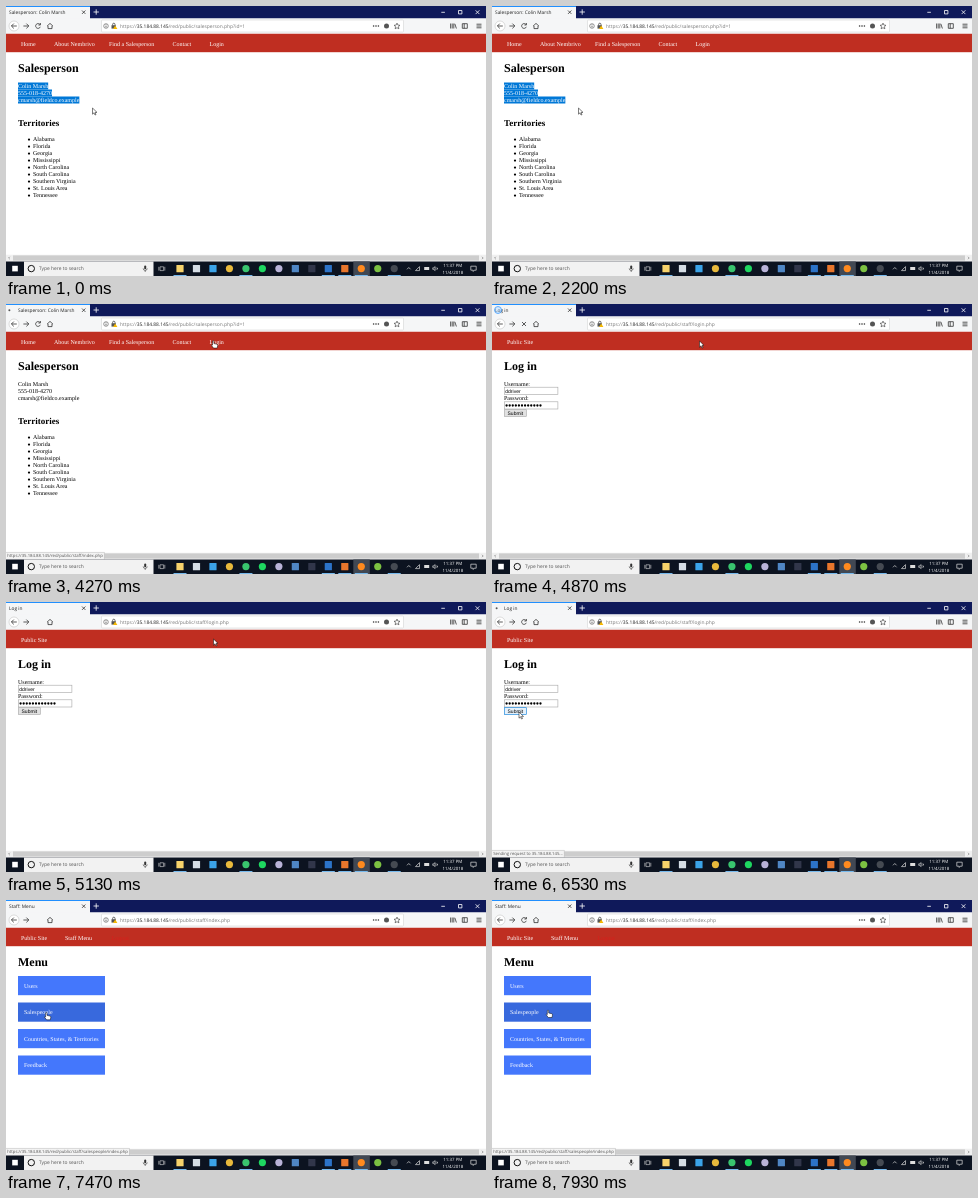
Animation of 480 by 270 pixels, one loop 8000 ms. Source, as an HTML page:

```html
<!DOCTYPE html>
<html lang="en">
<head>
<meta charset="utf-8">
<title>Browser session</title>
<style>
  html, body { margin: 0; width: 100%; height: 100%; overflow: hidden; background: #fff; }
  svg { display: block; width: 480px; height: 270px; }
  text { font: 6px "Liberation Serif", serif; fill: #000; text-rendering: geometricPrecision; white-space: pre; }
  .h1 { font-size: 12px; font-weight: bold; }
  .h2 { font-size: 9px; font-weight: bold; }
  .ui text { font-family: "Open Sans", sans-serif; font-size: 4.8px; fill: #222; }
  .field { font: 5px "Liberation Sans", sans-serif; }
  .white, .selected text { fill: #fff; }
  .line { fill: none; stroke: #333; stroke-width: .8; }
  .ui text.clock { font-size: 4.4px; fill: #fff; text-anchor: middle; }
</style>
</head>
<body>
<svg viewBox="0 0 480 270">
  <rect width="480" height="270" fill="#fff"/>
  <rect y="27.5" width="480" height="18.7" fill="#bf2e21"/>
  <g id="pages"></g>

  <g class="ui">
    <rect width="480" height="12.5" fill="#0f195a"/>
    <rect width="84" height="13" fill="#f5f6f7"/>
    <rect width="84" height=".9" fill="#0a84ff"/>
    <text id="title" y="8"></text>
    <circle id="dot" cy="6.2" r="1" fill="#555"/>
    <circle id="burst" cx="6" cy="6" fill="#9fd0ff" fill-opacity=".45" stroke="#3b9bff"/>
    <path class="line" d="M76 4.5l3.4 3.4m0-3.4l-3.4 3.4"/>
    <path class="line" style="stroke:#fff" d="M87.5 6h5.4M90.2 3.3v5.4M435.3 6.3h3.6M452.5 4.5h3.4v3.4h-3.4zM469.6 4.3l3.8 3.8m0-3.8l-3.8 3.8"/>

    <rect y="12.5" width="480" height="15" fill="#f5f6f7"/>
    <rect x="95.5" y="14" width="302" height="12" rx=".8" fill="#fff" stroke="#ccc" stroke-width=".5"/>
    <circle cx="8" cy="20" r="5" fill="#fff" stroke="#bbb" stroke-width=".5"/>
    <path class="line" d="M10.8 20H5.5m2.3-2.4L5.4 20l2.4 2.4M17.4 20h5.3m-2.3-2.4l2.4 2.4-2.4 2.4M41 20.2l3-2.8 3 2.8M42 20v2.6h4V20"/>
    <path id="reload" class="line" d="M34 18.6a2.4 2.4 0 1 0 .3 2.2M34.4 17v2h-2"/>
    <path id="stop" class="line" d="M30 18l4 4m0-4l-4 4"/>
    <circle class="line" style="stroke-width:.5" cx="100" cy="20" r="2.3"/>
    <path class="line" style="stroke-width:.7" d="M100 19.6v1.8M100 18.4v.5M106.6 19.4v-1a1.2 1.2 0 0 1 2.4 0v1"/>
    <path d="M105.5 19.2h4.4v3.4h-4.4z" fill="#555"/>
    <path d="M109.2 19.5l2.2 3.6h-4.4z" fill="#f5b800"/>
    <text id="url" x="114" y="21.8" style="font-size:4.9px"></text>
    <g fill="#333"><circle cx="367.6" cy="20" r=".8"/><circle cx="370" cy="20" r=".8"/><circle cx="372.4" cy="20" r=".8"/></g>
    <circle cx="380.5" cy="20" r="2.5" fill="#555"/>
    <path class="line" style="stroke-width:.6" d="M391 17.1l.9 2 2.1.2-1.6 1.4.5 2.1-1.9-1.1-1.9 1.1.5-2.1-1.6-1.4 2.1-.2z"/>
    <path class="line" d="M444.6 17.5v5M446.2 17.5v5M447.8 17.5v5M448.8 17.8l1.6 4.7M456.3 17.7h5v4.6h-5zM458.2 17.7v4.6M470.5 18.2h5M470.5 20h5M470.5 21.8h5"/>

    <rect y="248.7" width="480" height="7" fill="#f0f0f0"/>
    <rect x="7" y="249.4" width="466" height="5.2" fill="#cdcdcd"/>
    <path class="line" style="stroke:#666;stroke-width:.6" d="M3.8 250.8L2.6 252l1.2 1.2M476 250.8l1.2 1.2-1.2 1.2"/>
    <g id="status">
      <rect id="statusBox" x="-1" y="248.2" height="8" fill="#f3f3f3" stroke="#bbb" stroke-width=".5"/>
      <text id="statusText" x="1.2" y="253.4" style="font-size:4.25px;fill:#555"></text>
    </g>

    <rect y="255.5" width="480" height="14.5" fill="#0c1320"/>
    <rect x="18" y="255.5" width="129.5" height="14.5" fill="#f2f2f2"/>
    <rect x="6.2" y="259.8" width="5.6" height="5.6" fill="#fff"/>
    <circle cx="25.3" cy="262.6" r="3.2" fill="none" stroke="#111"/>
    <text x="33" y="264.4" style="font-size:4.9px;fill:#555">Type here to search</text>
    <rect x="138.2" y="259.4" width="2" height="3.8" rx="1" fill="#333"/>
    <path class="line" style="stroke-width:.6" d="M137.2 262.4a2 2 0 0 0 4 0M139.2 264.4v1.6"/>
    <path class="line" style="stroke:#ddd;stroke-width:.6" d="M154 260.8h3.6v3.8H154zM152.8 260.8v3.8M158.8 260.8v3.8"/>
    <rect x="347.3" y="255.5" width="16.5" height="14.5" fill="#414853"/>
    <g id="apps"></g>
    <path class="line" style="stroke:#ddd;stroke-width:.7" d="M401 263.3l1.8-1.8 1.8 1.8M409.5 264.6l4-4v4zM426.8 261.8h1l1.3-1.2v4l-1.3-1.2h-1zM430.4 261.8l1.6 1.6m0-1.6l-1.6 1.6M464.8 260.2h5.4v4h-2l-1 1.3v-1.3h-2.4z"/>
    <rect x="418.2" y="261" width="5" height="3" fill="#ddd"/>
    <text class="clock" x="446.8" y="260.9">11:37 PM</text>
    <text class="clock" x="446.8" y="267.6">11/4/2018</text>
  </g>

  <g id="cursor">
    <path id="arrow" d="M0 0v6.2l1.5-1.4 1 2.2 1-.4-1-2.2h2z" fill="#fff" stroke="#000" stroke-width=".5"/>
    <path id="hand" d="M-.7.5Q0-.4.7.5V3l3 .7q.9.3.8 1.2L4 7.5H.3L-1.9 4.7q.3-.8 1.2-.1z" fill="#fff" stroke="#000" stroke-width=".5"/>
  </g>
</svg>
<script>
const $ = id => document.getElementById(id);
const show = (id, on) => { $(id).style.display = on ? '' : 'none'; };
const text = (x, y, s, cls = '', extra = '') => `<text x="${x}" y="${y}" class="${cls}" ${extra}>${s}</text>`;
const rect = (x, y, w, h, fill, extra = '') => `<rect x="${x}" y="${y}" width="${w}" height="${h}" fill="${fill}" ${extra}/>`;
const nav = items => items.map(([x, s]) => text(x, 39.7, s, 'white')).join('');

const contact = ['Colin Marsh', '555-018-4270', 'cmarsh@fieldco.example'];
const territories = ['Alabama', 'Florida', 'Georgia', 'Mississippi', 'North Carolina',
  'South Carolina', 'Southern Virginia', 'St. Louis Area', 'Tennessee'];
const menu = ['Users', 'Salespeople', 'Countries, States, &amp; Territories', 'Feedback'];
const host = 'https://35.184.88.145';

const person = nav([[15, 'Home'], [48, 'About Nembrivo'], [103, 'Find a Salesperson'], [166.5, 'Contact'], [203.5, 'Login']])
  + text(12, 65.7, 'Salesperson', 'h1')
  + `<g id="contact">${contact.map((s, i) => text(12, 81.9 + 7 * i, s)).join('')}</g>`
  + text(12, 120.2, 'Territories', 'h2')
  + territories.map((s, i) => {
    const y = 135.4 + 7 * i;
    return `<circle cx="23" cy="${y - 1.8}" r="1.1"/>` + text(27, y, s);
  }).join('');

const box = 'stroke="#a5a5a5" stroke-width=".6"';
const login = nav([[15, 'Public Site']])
  + text(12, 65.7, 'Log in', 'h1')
  + text(12, 81.8, 'Username:') + rect(12.3, 83.2, 53.6, 7.3, '#fff', box) + text(13.3, 88.5, 'ddriver', 'field')
  + text(12, 96.4, 'Password:') + rect(12.3, 97.8, 53.6, 7.2, '#fff', box)
  + Array.from({ length: 12 }, (_, i) => `<circle cx="${14.6 + 3.08 * i}" cy="101.5" r="1.15"/>`).join('')
  + rect(12.3, 105.7, 22, 6.8, '#e1e1e1', box + ' id="submit"') + text(23.3, 110.9, 'Submit', 'field', 'text-anchor="middle"');

const staff = nav([[15, 'Public Site'], [59, 'Staff Menu']])
  + text(105.5, 39.7, 'Logout', '', 'style="fill:#d8201c"')
  + text(12, 65.7, 'Menu', 'h1')
  + menu.map((s, i) => rect(12, 76 + 26.5 * i, 87, 19.2, '#4477fc', `id="item${i}"`)
    + text(18, 87.7 + 26.5 * i, s, 'white')).join('');

const pages = [
  { body: person, title: 'Salesperson: ' + contact[0], path: 'salesperson.php?id=1' },
  { body: login, title: 'Log in', path: 'staff/login.php' },
  { body: staff, title: 'Staff: Menu', path: 'staff/index.php' }
];
$('pages').innerHTML = pages.map((p, i) => `<g id="page${i}">${p.body}</g>`).join('');

// Selection highlight behind the contact lines
const lines = [...$('contact').children];
$('contact').insertAdjacentHTML('afterbegin', '<g id="highlight">'
  + lines.map((l, i) => rect(12, 76.5 + 7 * i, l.getComputedTextLength(), 7, '#0078d7')).join('') + '</g>');

// Taskbar: colour, round, running
const apps = [['#f6d26b', 0, 1], ['#d5dde5', 0, 0], ['#3ba3e8', 0, 0], ['#e8b93c', 1, 0], ['#39c46e', 1, 1],
  ['#1ed760', 1, 0], ['#b9b3d8', 1, 0], ['#4f86c4', 0, 0], ['#31364a', 0, 0], ['#2c73c8', 0, 1],
  ['#e8762c', 0, 1], ['#ff8a1e', 1, 1], ['#7cc142', 1, 0], ['#454a52', 1, 1]];
$('apps').innerHTML = apps.map(([color, round, running], i) => {
  const x = 174 + 16.48 * i;
  return rect(x - 3.6, 259, 7.2, 7.2, color, `rx="${round ? 3.6 : .5}"`)
    + (running ? rect(x - 6.5, 269, 13, 1, '#76b9ed') : '');
}).join('');

const path = [[0, 86.5, 102], [2870, 86.5, 102], [3670, 222, 50], [3850, 207, 36.2], [4800, 207.5, 37],
  [5180, 207.5, 37], [5530, 128, 112], [5730, 128, 112], [6330, 27, 110], [6680, 27, 110],
  [7130, 36, 113], [7330, 36, 113], [7800, 56, 110]];
function cursorAt(t) {
  const i = path.findIndex(p => p[0] > t);
  if (i < 0) return path[path.length - 1].slice(1);
  const [t0, x0, y0] = path[i - 1], [t1, x1, y1] = path[i];
  const u = (t - t0) / (t1 - t0), k = u * u * (3 - 2 * u);
  return [x0 + (x1 - x0) * k, y0 + (y1 - y0) * k];
}

const loads = [{ start: 4100, end: 4800 }, { start: 6470, end: 7030 }];

function draw(t) {
  const page = loads.filter(l => t >= l.end).length;
  const loading = loads.find(l => t >= l.start && t < l.end);
  const age = page ? t - loads[page - 1].end : Infinity;
  const [x, y] = cursorAt(t);

  pages.forEach((p, i) => show('page' + i, i === page));
  $('title').textContent = pages[page].title;
  $('title').setAttribute('x', loading ? 12 : 3);
  $('url').innerHTML = `<tspan fill="#777">https://</tspan>35.184.88.145<tspan fill="#777">/red/public/${pages[page].path}</tspan>`;

  show('dot', loading);
  if (loading) $('dot').setAttribute('cx', 5.5 - 2.5 * Math.sin((t - loading.start) * 2 * Math.PI / 1050));
  show('burst', age < 300);
  $('burst').setAttribute('r', 2 + Math.min(age, 300) / 48);
  $('burst').setAttribute('opacity', Math.max(0, 1 - age / 400));
  show('stop', age < 200);
  show('reload', age > 450);

  const selected = t < 2870;
  show('highlight', selected);
  $('contact').setAttribute('class', selected ? 'selected' : '');

  const onSubmit = page === 1 && x < 34.5 && y > 105;
  $('submit').setAttribute('fill', onSubmit ? '#e5f1fb' : '#e1e1e1');
  $('submit').setAttribute('stroke', onSubmit ? '#0078d7' : '#a5a5a5');
  const onItem = page === 2;
  $('item1').setAttribute('fill', onItem ? '#3869dd' : '#4477fc');

  const onLogin = page === 0 && t > 3760;
  const status = onLogin ? host + '/red/public/staff/index.php'
    : loading ? 'Sending request to 35.184.88.145...'
    : t > 7400 ? host + '/red/public/staff/salespeople/index.php' : '';
  show('status', status);
  $('statusText').textContent = status;
  if (status) $('statusBox').setAttribute('width', $('statusText').getComputedTextLength() + 3.6);

  $('cursor').setAttribute('transform', `translate(${x} ${y})`);
  show('hand', onLogin || onItem);
  show('arrow', !onLogin && !onItem);
}

(function tick() {
  draw(performance.now() % 8000);
  requestAnimationFrame(tick);
})();
</script>
</body>
</html>
```
